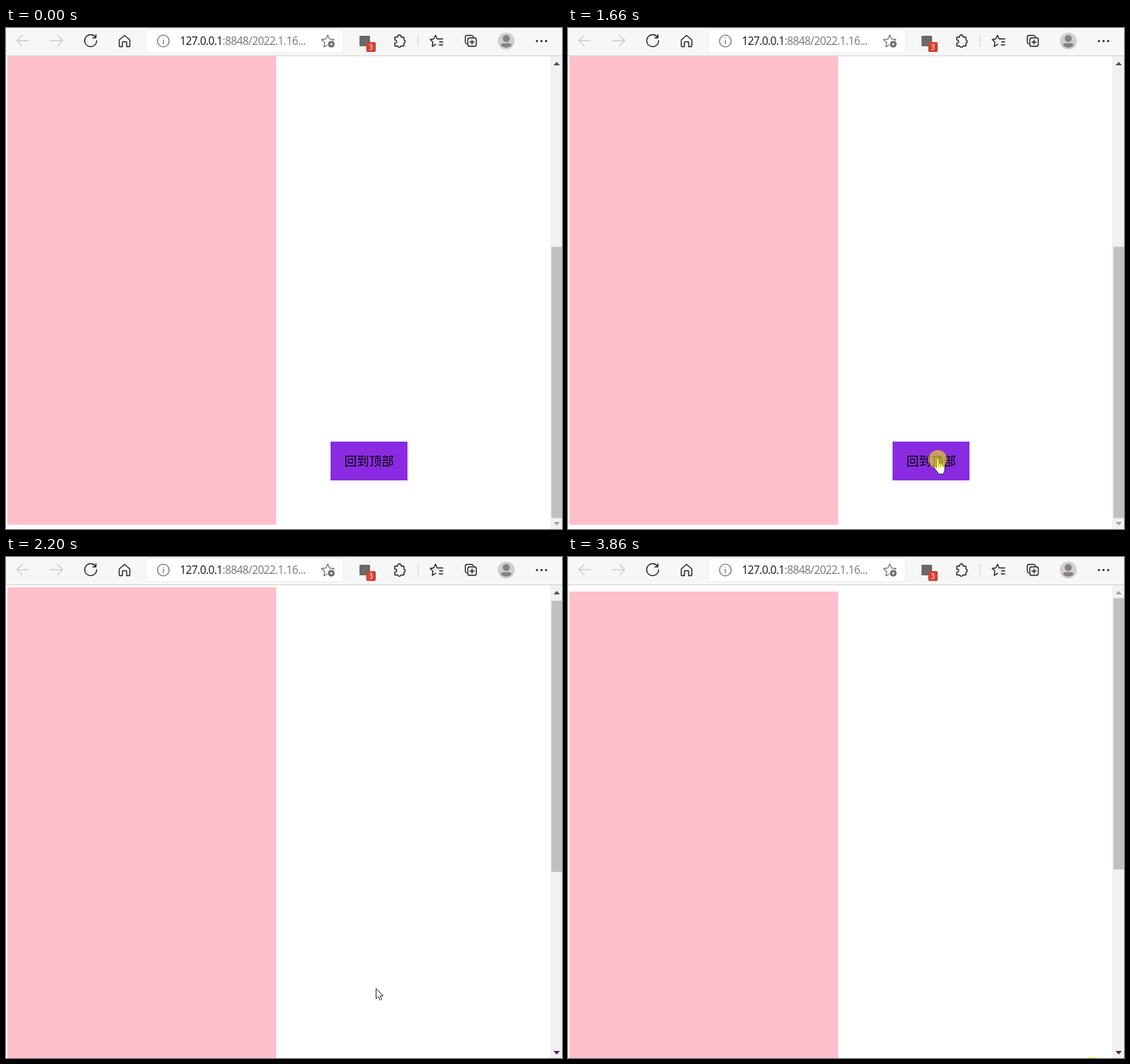
An HTML page that plays this animation: 788 by 711 pixels, repeating every 3990 ms.

```html
<!DOCTYPE html>
<html lang="zh-CN">
<head>
<meta charset="utf-8">
<title>回到顶部</title>
<style>
html, body { margin: 0; width: 100%; height: 100%; overflow: hidden; background: #fff; }
svg { display: block; }
.icon { fill: none; stroke: #1f1f1f; stroke-width: 1.4; stroke-linejoin: round; stroke-linecap: round; }
.off { stroke: #cbcbcb; }
.grey { stroke: #707070; stroke-width: 1.3; }
.url { font: 15.5px "Open Sans", "Noto Sans", sans-serif; letter-spacing: -.58px; fill: #777; }
.label { font: 17.6px "Noto Sans CJK SC", "Noto Sans CJK", sans-serif; }
.badge { font: 10px "Open Sans", sans-serif; fill: #fff; text-anchor: middle; }
</style>
</head>
<body>
<svg width="788" height="711" viewBox="0 0 788 711">
  <rect width="788" height="711" fill="#fff"/>
  <rect id="block" x="2" width="381" height="1093" fill="#ffc0cb"/>
  <g id="button">
    <rect x="460" y="587" width="109" height="55" fill="#8a2be2"/>
    <text class="label" x="479.5" y="621">回到顶部</text>
  </g>

  <!-- scrollbar -->
  <rect x="771" y="40" width="17" height="671" fill="#f1f1f1"/>
  <rect id="thumb" x="773" width="15" height="385" fill="#c1c1c1"/>
  <path id="up" d="M776 53l4.5-5 4.5 5z"/>
  <path id="down" d="M776 701l4.5 5 4.5-5z"/>

  <!-- toolbar -->
  <rect width="788" height="40" fill="#f7f7f7"/>
  <rect y="39" width="788" height="1" fill="#cfcfcf"/>
  <rect x="198.500" y="2" width="280" height="33" rx="4" fill="#fff" stroke="#ececec"/>
  <g class="icon">
    <path class="off" d="M32 18H15.500M23 10.500L15.500 18l7.500 7.500M63 18h17M73 10.500l7.500 7.500-7.500 7.500"/>
    <path d="M126.500 12.500A8.500 8.500 0 1 0 128.500 18M127.500 9.500v4.500h-4.500"/>
    <path d="M160.500 17l7.500-6.500 7.500 6.500v8.500q0 1-1 1h-3.500v-6q0-1-1-1h-4q-1 0-1 1v6h-3.500q-1 0-1-1z"/>
    <g class="grey">
      <circle cx="223" cy="18.500" r="8.300"/>
      <path d="M223 17.500v5M223 14.500v.1"/>
      <path d="M456 10l2.600 5.700 6.200.8-4.600 4.200 1.200 6-5.400-3-5.400 3 1.100-6-4.600-4.200 6.200-.8z"/>
    </g>
    <path d="M551 13h4a2.600 2.600 0 1 1 5 0h4v4a2.300 2.300 0 0 1 0 4.500v4h-4a2.600 2.600 0 0 1-5 0h-4v-4a2.300 2.300 0 1 0 0-4.500z"/>
    <path d="M612 15.500h7M614.500 19.800h4.500M614 24h5M612 15.500h-1l-2.300-5.200-2.500 5.200-5 .8 3.800 3.800-.9 6 5-2.900"/>
    <path d="M653 22.500q-2-.5-2-2.500v-7q0-2.500 2.500-2.500h6q2.500 0 3 2"/>
    <rect x="654.500" y="14" width="12" height="12" rx="2.500"/>
    <path d="M660.500 17v6M657.500 20h6"/>
  </g>
  <circle cx="461" cy="23" r="5.200" fill="#666" stroke="#fff"/>
  <path d="M458.500 23h5M461 20.500v5" stroke="#fff"/>
  <text class="url" x="246.500" y="24"><tspan fill="#161616">127.0.0.1</tspan>:8848/2022.1.16...</text>
  <rect x="501" y="11" width="15" height="15" rx="1" fill="#696969"/>
  <rect x="510.500" y="20" width="13.500" height="14" rx="2" fill="#d0432f"/>
  <text class="badge" x="517" y="31">3</text>
  <rect x="583.500" y="10" width="1" height="17" fill="#cfcfcf"/>
  <circle cx="709" cy="18.500" r="12" fill="#d0cecf"/>
  <circle cx="709" cy="15" r="5" fill="#858283"/>
  <path d="M701.500 25q0-3.500 3.500-3.500h8q3.500 0 3.500 3.500-7.500 6-15 0z" fill="#858283"/>
  <g fill="#1f1f1f"><circle cx="752.500" cy="18.500" r="1.500"/><circle cx="759" cy="18.500" r="1.500"/><circle cx="765.500" cy="18.500" r="1.500"/></g>

  <!-- pointer, with its tip at the origin -->
  <g id="pointer" fill="#fff" stroke="#222" stroke-linejoin="round">
    <path id="arrow" d="M.5.500v14.500l3.400-3.200 2.300 5 2.400-1.100-2.300-4.900h4.300z"/>
    <path id="hand" d="M-1.500 12V.5q0-1.500 1.500-1.500t1.500 1.500V6q1.200-1 2.600 0 .4.400.4 1 1.500-1 2.800.4l.2.800q1.700-.6 2.500 1v6q0 2-1.500 4v1.800h-8v-1.700L-4.600 13q-1-2 .5-2.500 1.200-.2 2.600 1.500zM1.500 6v4M4.500 7v3.500M7.500 8.500V11"/>
  </g>
  <circle id="halo" r="13" fill="#ff0" opacity=".55"/>
</svg>
<script>
const LOOP = 3990, TICK = 200 / 3, MAX_SCROLL = 437;
const el = id => document.getElementById(id);
const [block, button, thumb, up, down, pointer, arrow, hand, halo] =
  ["block", "button", "thumb", "up", "down", "pointer", "arrow", "hand", "halo"].map(el);

// time, x, y of the pointer tip
const path = [
  [533, 738, 700], [733, 585, 630], [867, 545, 603], [1000, 524, 612],
  [2666, 524, 612], [2733, 521, 609], [2933, 362, 385], [3000, 352, 369],
  [3067, 380, 410], [3200, 554, 659]
];

function pointerAt(t) {
  const i = path.findIndex(p => p[0] >= t);
  if (i < 1) return path[i < 0 ? path.length - 1 : 0].slice(1);
  const a = path[i - 1], b = path[i], u = (t - a[0]) / (b[0] - a[0]);
  return [a[1] + (b[1] - a[1]) * u, a[2] + (b[2] - a[2]) * u];
}

// exponential glide to the top, ending in whole-pixel steps
function scrollAt(t) {
  if (t < 1734) return MAX_SCROLL;
  if (t > 2260) return 0;
  return Math.round(260 * Math.exp((1800 - t) / 125) - 5);
}

const show = (node, on) => node.setAttribute("visibility", on ? "visible" : "hidden");
const place = (node, x, y) => node.setAttribute("transform", `translate(${Math.round(x)} ${Math.round(y)})`);

function draw(t) {
  const s = scrollAt(t), [x, y] = pointerAt(t);
  block.setAttribute("y", 49 - s);
  thumb.setAttribute("y", 58.5 + s * 252 / MAX_SCROLL);
  up.setAttribute("fill", s > 0 ? "#505050" : "#a3a3a3");
  down.setAttribute("fill", s < MAX_SCROLL ? "#4d2546" : "#a3a3a3");
  const buttonOn = s > 300;
  show(button, buttonOn);

  const inView = t > 530 && t < 3230;
  const over = buttonOn && x > 460 && x < 569 && y > 587 && y < 642;
  show(arrow, inView && !over);
  show(hand, inView && over);
  place(pointer, x, y);

  const leaving = t > 3860;
  show(halo, leaving || t > 1660 && t < 1790);
  if (leaving) place(halo, 744, 722);
  else place(halo, x, y);
}

const start = performance.now();
function frame() {
  const t = (performance.now() - start) % LOOP;
  draw(Math.floor((t + 10) / TICK) * TICK);
  requestAnimationFrame(frame);
}
frame();
</script>
</body>
</html>
```
